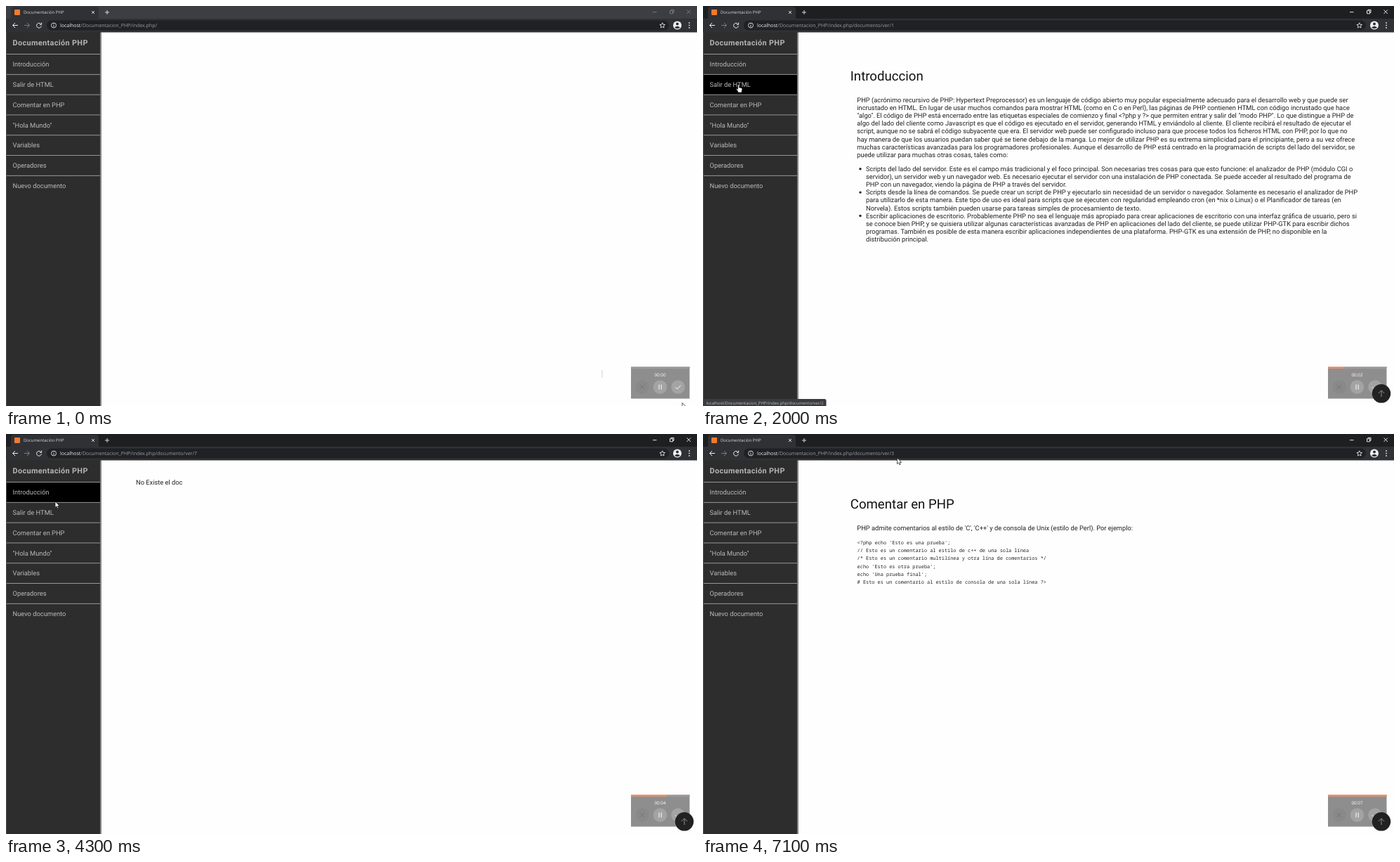
These frames come from a looping animation (984 by 569 pixels, 7.2 s). An HTML page:

```html
<!DOCTYPE html>
<html lang="es">
<head>
<meta charset="utf-8">
<title>Documentación PHP</title>
<style>
html, body { margin: 0; width: 100%; height: 100%; overflow: hidden; background: #fff; }
svg { display: block; width: 984px; height: 569px; }
text { text-rendering: geometricPrecision; white-space: pre; }
.ui { font-family: "Open Sans", "Noto Sans", sans-serif; }
.doc { font: 9.32px Roboto, sans-serif; fill: #222; }
.head { font-size: 18.64px; fill: #111; }
.code { font: 6.92px "Noto Sans Mono", monospace; fill: #222; }
.menu { font: 9.32px Roboto, sans-serif; fill: #b9b9b9; }
.brand { font: bold 10.9px Roboto, sans-serif; letter-spacing: .35px; fill: #b4b4b4; }
.line { fill: none; stroke-width: 1; }
</style>
</head>
<body>
<svg id="stage" viewBox="0 0 984 569" xmlns="http://www.w3.org/2000/svg"></svg>
<script>
const LOOP = 7200, STEP = 100, END = 7100;
const ROOT = 'Documentacion_PHP/index.php/';
const ITEMS = ['Introducción', 'Salir de HTML', 'Comentar en PHP', '"Hola Mundo"',
  'Variables', 'Operadores', 'Nuevo documento'];
const ROW_TOP = 68.5, ROW_H = 28.8;

// Timeline tables: [start ms, value]
const PAGES = [[0, ''], [1400, '1'], [2500, '2'], [3600, '7'], [6800, '3']];
const URLS = [[0, ''], [1400, 'documento/ver/1'], [2500, 'documento/ver/2'],
  [3600, 'documento/ver/7'], [6300, 'documento/ver/'], [6400, 'documento/ver/3']];
const LOADS = [[1000, 1400], [2200, 2500], [3100, 3600], [6500, 6800]];
const FOCUS_AT = 900, EDIT = [5400, 6500], SELECT = [5600, 6300];
const PATH = [[0, 963, 564.5], [800, 41, 88], [1000, 42, 84], [1300, 42, 84], [1700, 50.5, 112],
  [2300, 50.5, 112], [3000, 47.5, 258], [3300, 47.5, 259.5], [3600, 47.5, 259.5],
  [4000, 88, 118], [4300, 70, 96], [4800, 150, 90], [5300, 274, 28], [5600, 272, 28],
  [6100, 140, 94], [6500, 190, 72], [7100, 276.5, 34]];

const esc = s => s.replace(/&/g, '&amp;').replace(/</g, '&lt;').replace(/>/g, '&gt;');
const text = (x, y, s, cls) => `<text x="${x}" y="${y}" class="${cls}">${esc(s)}</text>`;
const lines = (x, y, gap, cls, s) =>
  s.trim().split('\n').map((l, i) => text(x, y + i * gap, l, cls)).join('');
const rect = (x, y, w, h, fill, more = '') =>
  `<rect x="${x}" y="${y}" width="${w}" height="${h}" fill="${fill}" ${more}/>`;
const circle = (x, y, r, fill) => `<circle cx="${x}" cy="${y}" r="${r}" fill="${fill}"/>`;
const path = (d, stroke, more = '') => `<path class="line" d="${d}" stroke="${stroke}" ${more}/>`;
const group = (id, body) => `<g id="${id}">${body}</g>`;
const heading = s => text(209.8, 105.7, s, 'doc head');
const body = (x, y, s) => lines(x, y, 11.1, 'doc', s);
const code = (y, s) => lines(219.6, y, 11.08, 'code', s);
const bullet = (y, s) => circle(224, y - 3.2, 1.7, '#222') + body(232, y, s);

const intro = heading('Introduccion') + body(219.3, 137, `
PHP (acrónimo recursivo de PHP: Hypertext Preprocessor) es un lenguaje de código abierto muy popular especialmente adecuado para el desarrollo web y que puede ser
incrustado en HTML. En lugar de usar muchos comandos para mostrar HTML (como en C o en Perl), las páginas de PHP contienen HTML con código incrustado que hace
"algo". El código de PHP está encerrado entre las etiquetas especiales de comienzo y final <?php y ?> que permiten entrar y salir del "modo PHP". Lo que distingue a PHP de
algo del lado del cliente como Javascript es que el código es ejecutado en el servidor, generando HTML y enviándolo al cliente. El cliente recibirá el resultado de ejecutar el
script, aunque no se sabrá el código subyacente que era. El servidor web puede ser configurado incluso para que procese todos los ficheros HTML con PHP, por lo que no
hay manera de que los usuarios puedan saber qué se tiene debajo de la manga. Lo mejor de utilizar PHP es su extrema simplicidad para el principiante, pero a su vez ofrece
muchas características avanzadas para los programadores profesionales. Aunque el desarrollo de PHP está centrado en la programación de scripts del lado del servidor, se
puede utilizar para muchas otras cosas, tales como:`) +
  bullet(235, `
Scripts del lado del servidor. Este es el campo más tradicional y el foco principal. Son necesarias tres cosas para que esto funcione: el analizador de PHP (módulo CGI o
servidor), un servidor web y un navegador web. Es necesario ejecutar el servidor con una instalación de PHP conectada. Se puede acceder al resultado del programa de
PHP con un navegador, viendo la página de PHP a través del servidor.`) +
  bullet(268.3, `
Scripts desde la línea de comandos. Se puede crear un script de PHP y ejecutarlo sin necesidad de un servidor o navegador. Solamente es necesario el analizador de PHP
para utilizarlo de esta manera. Este tipo de uso es ideal para scripts que se ejecuten con regularidad empleando cron (en *nix o Linux) o el Planificador de tareas (en
Norvela). Estos scripts también pueden usarse para tareas simples de procesamiento de texto.`) +
  bullet(301.6, `
Escribir aplicaciones de escritorio. Probablemente PHP no sea el lenguaje más apropiado para crear aplicaciones de escritorio con una interfaz gráfica de usuario, pero si
se conoce bien PHP, y se quisiera utilizar algunas características avanzadas de PHP en aplicaciones del lado del cliente, se puede utilizar PHP-GTK para escribir dichos
programas. También es posible de esta manera escribir aplicaciones independientes de una plataforma. PHP-GTK es una extensión de PHP, no disponible en la
distribución principal.`);

const escape = heading('Salir de HTML') + body(219.3, 137, `
Cualquier cosa fuera de un par de etiquetas de apertura y cierre es ignorado por el intérprete de PHP, lo que permite que los ficheros de PHP tengan contenido mixto. Esto
hace que PHP pueda ser embebido en documentos HTML para, por ejemplo, crear plantillas.`) +
  code(168.3, `
<p>Esto va a ser ignorado por PHP y mostrado por el navegador.</p>
<?php echo 'Mientras que esto va a ser interpretado.'; ?>
<p>Esto también será ignorado por PHP y mostrado por el navegador.</p>`);

const comment = heading('Comentar en PHP') +
  body(219.3, 137, `PHP admite comentarios al estilo de 'C', 'C++' y de consola de Unix (estilo de Perl). Por ejemplo:`) +
  code(157.3, `
<?php echo 'Esto es una prueba';
// Esto es un comentario al estilo de c++ de una sola línea
/* Esto es un comentario multilínea y otra lína de comentarios */
echo 'Esto es otra prueba';
echo 'Una prueba final';
# Esto es un comentario al estilo de consola de una sola línea ?>`);

const pages = group('page1', intro) + group('page2', escape) +
  group('page7', body(185, 71.8, 'No Existe el doc')) + group('page3', comment);

const sidebar = rect(0, 37, 135, 532, '#2d2d2e') + rect(0, 37, 1, 532, '#4a4a4b') +
  rect(134, 37.5, 2, 531.5, '#858585') +
  rect(1, 0, 133, ROW_H - .3, '#000', 'id="hover"') +
  text(9.6, 56, 'Documentación PHP', 'brand') +
  ITEMS.map((s, i) => {
    const y = ROW_TOP + i * ROW_H;
    return rect(1, y - .4, 133, .9, '#a2a2a2') + text(9.5, y + 17.6, s, 'menu item');
  }).join('');

const chrome = rect(0, 0, 984, 19, '#3c3e41', 'id="strip"') +
  `<path d="M4 19Q7 19 7 16V5Q7 1 11 1H128Q132 1 132 5V16Q132 19 135 19Z" fill="#303134"/>` +
  rect(0, 18, 984, 19.5, '#303134') +
  rect(58, 20.5, 886, 14, '#202124', 'rx="7" id="pill"') +
  rect(12, 5, 8, 8, '#ee7b30', 'rx="1" id="icon"') +
  path('M0 -3.5A3.5 3.5 0 0 1 3.5 0', '#a9b4c4', 'id="spin"') +
  `<text x="25" y="11.2" class="ui" font-size="6" fill="#d5d7da">Documentación PHP</text>` +
  path('M122 7L126 11M126 7L122 11', '#d5d7da') +
  path('M141 9H147M144 6V12', '#d5d7da') +
  group('controls', path('M921 8.7H926.5M945.5 6.8H949.5V10.8H945.5ZM947 6.5V5.3H951V9.3H949.8M969.5 5.5L975 11M975 5.5L969.5 11',
    'currentColor', 'stroke-width=".8"')) +
  path('M17 27.5H9.5M13 24L9.5 27.5L13 31', '#eee', 'stroke-width="1.2"') +
  path('M26 27.5H33.5M30 24L33.5 27.5L30 31', '#7b7d80') +
  group('reload', path('M49.6 25.5A3.4 3.4 0 1 0 50.4 28.3M50.6 23.6V26.3H47.9', '#eee', 'stroke-width="1.2"')) +
  group('stop', path('M44 24.5L50 30.5M50 24.5L44 30.5', '#eee', 'stroke-width="1.2"')) +
  `<circle class="line" cx="68" cy="27.5" r="3.5" stroke="#d0d2d5"/>` +
  path('M68 27V29.6M68 25.2V26.2', '#d0d2d5') +
  rect(265.4, 22.5, 6.9, 10.5, '#3970c4', 'id="mark"') +
  `<text x="77" y="30" class="ui" font-size="7" fill="#989da3"><tspan fill="#eceef0">localhost</tspan><tspan id="url"></tspan><tspan id="tail" fill="#fff"></tspan></text>` +
  path('M934.7 23.8L935.8 26.3L938.5 26.5L936.4 28.3L937.1 31L934.7 29.6L932.3 31L933 28.3L930.9 26.5L933.6 26.3Z', '#d5d7da', 'stroke-width=".9"') +
  circle(956, 27.5, 6, '#f0f0f0') + circle(956, 25.5, 2, '#303134') +
  `<path d="M952 30.8Q956 26.8 960 30.8Q956 33.6 952 30.8Z" fill="#303134"/>` +
  [24, 27.5, 31].map(y => circle(973, y, .9, '#e4e4e4')).join('');

const recorder = rect(890, 513, 83.5, 45.5, '#8e8e8e') + rect(890, 513, 83.5, 2.6, '#a49d9c') +
  rect(890, 513, 0, 2.6, '#ea9069', 'id="bar"') +
  `<text id="clock" x="931.5" y="526.6" class="ui" font-size="6.3" text-anchor="middle" fill="#fff"></text>` +
  circle(906, 542, 9.8, '#898989') + path('M902.7 538.7L909.3 545.3M909.3 538.7L902.7 545.3', '#777') +
  circle(931.5, 542, 9.8, '#a3a3a3') + circle(957, 542, 9.8, '#a3a3a3') +
  path('M930 538.5V545.5M933.2 538.5V545.5', '#fff', 'stroke-width="1.4"') +
  path('M953 542.3L955.7 545L961 539.5', '#fff', 'stroke-width="1.3"');

const extras = group('toTop', circle(966, 551.3, 13.2, '#222') +
    path('M966 556V547M961.8 551L966 546.8L970.2 551', '#8f8f8f', 'stroke-width="1.2"')) +
  group('status', `<path d="M0 559H173Q175.5 559 175.5 561.5V569H0Z" fill="#3b3c3f"/>` +
    `<text id="link" x="4.5" y="566.7" class="ui" font-size="6" fill="#b9bdc2"></text>`) +
  rect(848.6, 518, .7, 10.5, '#bbb', 'id="ghost"');

const pointer = group('cursor',
  group('arrow', `<path d="M0 0V8.6L2 6.8L3.3 9.8L4.7 9.2L3.5 6.3H6.2Z" fill="#fff" stroke="#111" stroke-width=".7"/>`) +
  group('hand', `<path d="M-.9 .9Q0 -.7 .9 .9V4L4.5 4.7Q5.4 5 5.3 6.2L4.6 9.6V11H-.6V9.8L-3 6.6Q-3 5.2 -1.7 5.9L-.9 6.7Z" fill="#fff" stroke="#111" stroke-width=".6"/>`) +
  group('beam', path('M-1.5 -4.5H1.5M0 -4.5V4.5M-1.5 4.5H1.5', '#ddd', 'stroke-width=".8"')));

const stage = document.getElementById('stage');
stage.innerHTML = rect(0, 0, 984, 569, '#fefefe') + pages + sidebar + chrome + recorder + extras + pointer;

const el = {};
stage.querySelectorAll('[id]').forEach(n => el[n.id] = n);
const items = [...stage.querySelectorAll('.item')];
const show = (id, on) => el[id].style.display = on ? '' : 'none';
const set = (id, k, v) => el[id].setAttribute(k, v);
const at = (table, t) => table.filter(r => r[0] <= t).pop()[1];
const within = (t, [a, b]) => t >= a && t < b;

function cursorAt(t) {
  const i = Math.max(1, PATH.findIndex(p => p[0] >= t));
  const [a, b] = [PATH[i - 1], PATH[i]];
  const u = (t - a[0]) / (b[0] - a[0]), k = u * u * (3 - 2 * u);
  return [a[1] + (b[1] - a[1]) * k, a[2] + (b[2] - a[2]) * k];
}

function draw(t) {
  const focused = t >= FOCUS_AT, page = at(PAGES, t);
  const loading = LOADS.some(r => within(t, r));
  ['1', '2', '7', '3'].forEach(n => show('page' + n, n === page));
  show('toTop', page);
  show('ghost', t < STEP);

  set('strip', 'fill', focused ? '#1e1f21' : '#3c3e41');
  el.controls.style.color = focused ? '#e6e6e6' : '#77797c';
  set('pill', 'stroke', within(t, EDIT) ? '#34507c' : 'none');
  show('icon', !loading);
  show('spin', loading);
  set('spin', 'transform', `translate(16 9) rotate(${-t * .36 + 1140})`);
  show('reload', !loading);
  show('stop', loading);

  const url = '/' + ROOT + at(URLS, t), cut = within(t, SELECT) ? url.length - 2 : url.length;
  el.url.textContent = url.slice(0, cut);
  el.tail.textContent = url.slice(cut);
  show('mark', cut < url.length);

  set('bar', 'width', 83.5 * t / END);
  el.clock.textContent = '00:0' + Math.floor(t / 1000);

  const [x, y] = cursorAt(t);
  const row = Math.floor((y - ROW_TOP) / ROW_H);
  const over = x < 134 && row >= 0 && row < ITEMS.length;
  const mid = ROW_TOP + (row + .5) * ROW_H;
  const onLink = over && focused && Math.abs(y - mid) < 5 &&
    x > 9 && x < 10 + items[row].getComputedTextLength();
  const inUrl = y > 20 && y < 33 && x > 60 && x < 930;
  show('hover', over);
  if (over) set('hover', 'y', ROW_TOP + row * ROW_H + .4);
  show('status', onLink);
  if (onLink) el.link.textContent = `localhost/${ROOT}documento/ver/${row + 1}`;
  show('hand', onLink);
  show('beam', inUrl);
  show('arrow', !onLink && !inUrl);
  set('cursor', 'transform', `translate(${x} ${y})`);
}

const start = performance.now();
function tick() {
  const t = (performance.now() - start) % LOOP;
  draw(Math.floor(t / STEP) * STEP);
  requestAnimationFrame(tick);
}
tick();
</script>
</body>
</html>
```
